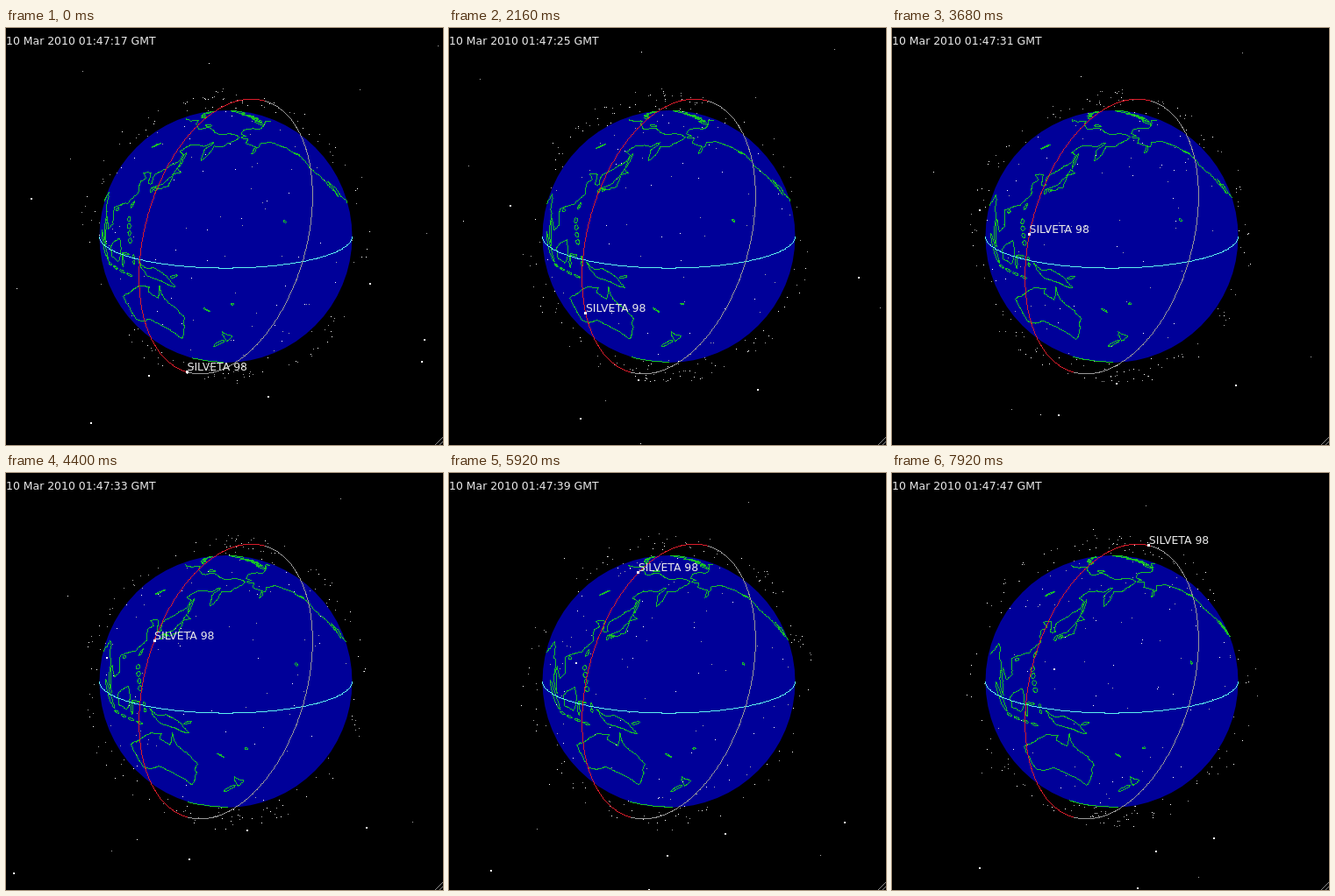
These frames come from a looping animation (498x476 px, 8000 ms). An HTML page with a canvas:

```html
<!DOCTYPE html>
<html lang="en">
<head>
<meta charset="utf-8">
<title>Satellite orbit view</title>
<style>
  html, body { margin: 0; width: 100%; height: 100%; overflow: hidden; background: #000; }
  canvas { display: block; width: 498px; height: 476px; }
</style>
</head>
<body>
<canvas id="view" width="498" height="476"></canvas>
<script>
const ctx = document.getElementById('view').getContext('2d');
const W = 498, H = 476, CX = 250.5, CY = 238, R = 144;
const STEP = 80, COUNT = 100, RAD = Math.PI / 180;
const TILT = 14.5 * RAD, SIN_T = Math.sin(TILT), COS_T = Math.cos(TILT);
const LABEL = 'SILVETA 98';

let seed = 20100;
const rnd = () => (seed = (seed * 16807) % 2147483647) / 2147483647;

// ---- Coastlines: a few key points, roughened by midpoint displacement ----
const coasts = [];

function roughen(a, b, out) {
  const dx = b[0] - a[0], dy = b[1] - a[1];
  if (Math.hypot(dx * Math.cos(a[1] * RAD), dy) < 1.6) { out.push(b); return; }
  const k = (rnd() - .5) * .28;
  const mid = [(a[0] + b[0]) / 2 - dy * k, (a[1] + b[1]) / 2 + dx * k * .6];
  roughen(a, mid, out);
  roughen(mid, b, out);
}

// Key points as longitude, latitude pairs
function shore(...c) {
  const out = [[c[0], c[1]]];
  for (let i = 2; i < c.length; i += 2) roughen([c[i - 2], c[i - 1]], [c[i], c[i + 1]], out);
  coasts.push(out);
}

// A row of n slim islands between two places
function isles(x0, y0, x1, y1, width, n = 1) {
  const dx = (x1 - x0) / n, dy = (y1 - y0) / n;
  const len = Math.hypot(dx, dy), fill = n > 1 ? .7 : 1;
  for (let i = 0; i < n; i++) {
    const ring = [];
    for (let j = 0; j < 10; j++) {
      const a = j * 36 * RAD, rough = .8 + .4 * rnd();
      const along = i + .5 + Math.cos(a) * fill / 2;
      const side = Math.sin(a) * rough * width / 2 / len;
      ring.push([x0 + dx * along - dy * side, y0 + dy * along + dx * side]);
    }
    coasts.push([...ring, ring[0]]);
  }
}

// Asia: south coast, Pacific coast, Arctic coast
shore(80, 15, 88, 22, 92, 21, 95, 16, 98, 15, 99, 8, 103.5, 1.3, 102, 6.5, 99.7, 11, 100.5, 13.4,
  104.8, 8.7, 109, 12, 106, 19, 110, 21, 117, 23.5, 122, 29.5, 119.5, 35, 122.4, 37, 118, 39,
  124, 40, 126.4, 35, 129.3, 35.5, 127.7, 39.5);
shore(127.7, 39.5, 132, 43, 140.3, 49, 141, 53, 136, 54.5, 142, 59.3, 155, 59.5, 163, 62.4,
  156, 57, 156.7, 51, 162, 56, 164, 60, 179, 62.4, 190, 66);
shore(190, 66, 180, 69, 160, 69.7, 130, 71.5, 108, 76.5, 73, 71.5);
isles(104, 51.7, 109.6, 55.6, 1);      // lake
isles(137, 75, 150, 75, 1.5);
isles(20, 79, 105, 80, 2, 4);
// America
shore(-90, 69, -128, 70, -157, 71.3, -166, 68.3, -162, 66.3, -168, 65.6, -161, 64.5, -165.5, 61.5,
  -158, 58.7, -164.5, 54.7, -151, 60.5, -140, 59.7, -130, 54, -124, 48, -124, 41, -118, 33.8,
  -115, 29, -110, 23, -114, 31.5, -106, 22, -95, 16);
isles(-124, 72, -80, 81, 5, 4);
isles(-70, 81, -20, 80, 4);
isles(-128, 50.7, -123.6, 48.5, 1);
isles(-156, 20.2, -155, 19, 1);
// Japan, Sakhalin
shore(131, 34, 137, 37, 141, 41.3, 140.8, 36, 135.8, 33.7, 131, 34);
shore(140.3, 41.7, 141.8, 45.4, 145.3, 43.5, 140.3, 41.7);
isles(130.5, 31.3, 130.8, 33.8, 1.6);
isles(132.3, 33, 134.6, 34, 1.1);
isles(142.3, 46, 142.6, 54.3, 1.5);
// South-east Asia
isles(120.5, 22, 121.6, 25.3, 1.2);
isles(108.7, 18.8, 111, 19.6, 1.5);
isles(121, 18.5, 125.5, 6, 2.3, 4);
isles(95.3, 5.6, 106, -5.8, 2.8);
isles(105, -6.7, 127, -9, 1, 4);
isles(120, -5.5, 120.2, 1, 1.3);
isles(120, .8, 125, 1.3, .8);
isles(127.7, 2, 128.3, -3.2, 1, 2);
shore(109, 1.5, 117, 7, 118.5, 1, 116, -4, 110, -3, 109, 1.5);
// Oceania
shore(131, -.8, 135, -3.3, 140, -2.4, 147.5, -6.3, 150.8, -10.3, 143.5, -8.3, 138, -7.5, 133, -4, 131, -.8);
isles(148.5, -5.9, 152.2, -4.6, 1);
isles(164, -20.3, 167, -22.3, .6);
isles(177.2, -17.8, 178.6, -18, .9);
shore(114, -22, 122, -18, 130, -13, 136.8, -12.2, 135.6, -15, 140.5, -17.5, 142.5, -10.8, 146, -19,
  153.4, -27, 150, -37.5, 147, -41.5, 138, -34.5, 131, -31.5, 124, -33.7, 115.2, -34.3, 114, -22);
shore(172.8, -34.5, 178.4, -37.7, 175.3, -41.6, 174, -39, 172.8, -34.5);
isles(167, -46, 173.7, -41, 2);
shore(80, -67, 110, -66, 140, -66.8, 171, -71.5);

// ---- Satellites ----
function makeSat(low, high) {
  const polar = rnd() < .65;
  return {
    r: low + (high - low) * rnd(),
    node: rnd() * 2 * Math.PI,
    inc: (polar ? 80 + 20 * rnd() : 40 + 35 * rnd()) * RAD,
    phase: rnd() * 2 * Math.PI,
    color: rnd() < .45 ? '#fff' : '#a8a8a8'
  };
}
const sats = Array.from({ length: 320 }, () => makeSat(1.06, 1.18))
  .concat(Array.from({ length: 5 }, () => makeSat(1.3, 2)));

// High orbits: start x, y and drift per degree of the tracked orbit
const near = [
  [29, 195, .873, .162], [415, 292, 1.11, -.16], [97, 451, 1.142, -.106], [163, 397, 1.142, .112],
  [299, 421, 1.142, -.162], [477, 356, 1.14, -.1], [474, 381, 1.14, -.1], [-102, 464, 1.13, -.075],
  [75, 479.5, 1.148, -.03]
];
const far = [[87, 49, -1.1, .2], [73, 149, -1.08, .18], [403, 70, -1.15, .2], [492, 20, -1.13, .1]];

// ---- Drawing helpers ----
function dot(x, y, size, color) {
  ctx.fillStyle = color;
  ctx.fillRect(Math.round(x - size / 2), Math.round(y - size / 2), size, size);
}

// Crisp one-pixel line
function line(x0, y0, x1, y1) {
  const n = Math.max(1, Math.ceil(Math.max(Math.abs(x1 - x0), Math.abs(y1 - y0))));
  for (let i = 0; i <= n; i++) {
    ctx.fillRect(Math.floor(x0 + (x1 - x0) * i / n), Math.floor(y0 + (y1 - y0) * i / n), 1, 1);
  }
}

function project(x, y, z) {
  return { x: CX + R * y, y: CY - R * (z * COS_T - x * SIN_T), depth: z * SIN_T + x * COS_T };
}

function geo(lon, lat, mid) {
  const a = (lon - mid) * RAD, b = lat * RAD;
  return project(Math.cos(b) * Math.cos(a), Math.cos(b) * Math.sin(a), Math.sin(b));
}

function polyline(points, color) {
  ctx.fillStyle = color;
  for (let i = 1; i < points.length; i++) {
    const a = points[i - 1], b = points[i];
    if (a.depth >= -.001 && b.depth >= -.001) line(a.x, a.y, b.x, b.y);
  }
}

const overGlobe = (x, y) => Math.hypot(x - CX, y - CY) < R;

function orbitPoint(deg) {
  const a = 161 * Math.cos(deg * RAD), b = 92 * Math.sin(deg * RAD);
  return { x: CX + .273 * a - .962 * b, y: CY - .962 * a - .273 * b, depth: 1 };
}

function orbitArc(from, color) {
  polyline(Array.from({ length: 91 }, (_, i) => orbitPoint(from + 2 * i)), color);
}

// ---- Scene ----
// Degrees flown: a slightly slow start, then a steady rate
const turnAt = step => 1.838 * step - 3 * (1 - Math.exp(-step / 8));

function drawGlobe(mid) {
  ctx.fillStyle = '#000099';
  ctx.beginPath();
  ctx.arc(CX, CY, R, 0, 2 * Math.PI);
  ctx.fill();
  for (const c of coasts) polyline(c.map(([lon, lat]) => geo(lon, lat, mid)), '#18c028');
  polyline(Array.from({ length: 61 }, (_, i) => geo(3 * i - 90, 0, 0)), '#5cf0f0');
}

function drawSats(turn) {
  for (const s of sats) {
    const u = s.phase + turn * RAD * Math.pow(1.122 / s.r, 1.5);
    const c = Math.cos(u), k = Math.sin(u) * Math.cos(s.inc);
    const cn = Math.cos(s.node), sn = Math.sin(s.node);
    const p = project(s.r * (cn * c - sn * k), s.r * (sn * c + cn * k), s.r * Math.sin(u) * Math.sin(s.inc));
    if (p.depth > 0 || !overGlobe(p.x, p.y)) dot(p.x, p.y, 1, s.color);
  }
  for (const [x, y, vx, vy] of far) {
    const px = x + vx * turn, py = y + vy * turn;
    if (!overGlobe(px, py)) dot(px, py, 1, '#aaa');
  }
  for (const [x, y, vx, vy] of near) dot(x + vx * turn, y + vy * turn, 2, '#fff');
}

function drawText(turn, sat) {
  const sec = Math.floor(17.3 + turn / 5.9);
  ctx.font = '12.45px "DejaVu Sans", sans-serif';
  ctx.fillStyle = '#e8e8e8';
  ctx.fillText(`10 Mar 2010 01:47:${sec} GMT`, 0, 19);
  ctx.fillText(LABEL, sat.x, sat.y - 1.5);
}

function draw(step) {
  const turn = turnAt(step), sat = orbitPoint(180 - turn);
  ctx.fillStyle = '#000';
  ctx.fillRect(0, 0, W, H);
  drawGlobe(174.8 - .0688 * turn);
  drawSats(turn);
  orbitArc(180, '#989898');
  orbitArc(0, '#d81c2a');
  dot(sat.x, sat.y, 3, '#fff');
  drawText(turn, sat);
  // Window grip
  ctx.fillStyle = '#8c8c8c';
  line(489, 475, 497, 467);
  line(494, 475, 497, 472);
}

const start = performance.now();
function tick() {
  draw(Math.floor((performance.now() - start) / STEP) % COUNT);
  requestAnimationFrame(tick);
}
tick();
</script>
</body>
</html>
```
